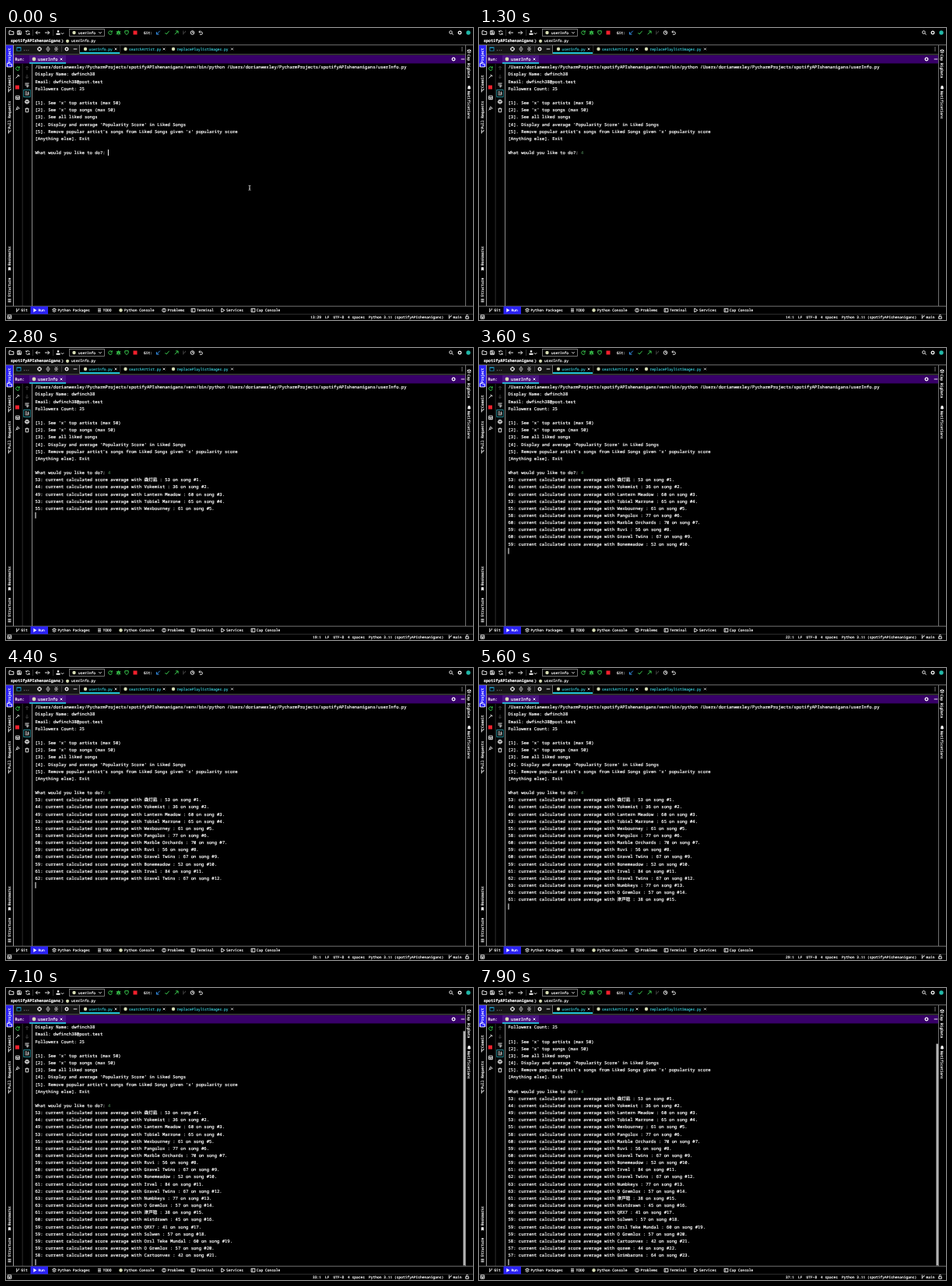
Animation of 600x375 px, one loop 8 s. Source, as an HTML page with a canvas:

```html
<!DOCTYPE html>
<html lang="en">
<head>
<meta charset="utf-8">
<title>Console run</title>
<style>
  html, body { margin: 0; width: 100%; height: 100%; overflow: hidden; background: #000; }
  canvas { display: block; width: 600px; height: 375px; }
</style>
</head>
<body>
<canvas id="stage" width="600" height="375"></canvas>
<script>
const ctx = document.getElementById('stage').getContext('2d');
ctx.textRendering = 'geometricPrecision';

const LOOP = 8000;
const MONO = '"Noto Sans Mono", "DejaVu Sans Mono", "Noto Sans CJK JP", "Noto Sans CJK", monospace';
const WHITE = '#fff', GREY = '#8c8c8c', DIM = '#4a4a4a', GREEN = '#3fdc55', RED = '#f2202c',
      BLUE = '#3aa0ff', CYAN = '#22d3e6', PURPLE = '#380069', SELECT = '#2b22f5', PY = '#d6dcb4';

const UI = 4.58;
const CODE = 5.56, CELL = CODE * 0.6, ROW = 9.15, LEFT = 37.5, TOP = 52.3;
const VISIBLE_ROWS = 34, PROMPT_ROW = 12;
const TYPED_AT = 100, ENTER_AT = 300, STATUS_LAG = 200, BLINK = 530;

const project = '/Users/dorianwexley/PycharmProjects/spotifyAPIshenanigans';
const intro = [
  `${project}/venv/bin/python ${project}/userInfo.py`,
  'Display Name: dwfinch38',
  'Email: dwfinch38@post.test',
  'Followers Count: 25',
  '',
  "[1]. See 'x' top artists (max 50)",
  "[2]. See 'x' top songs (max 50)",
  '[3]. See all liked songs',
  "[4]. Display and average 'Popularity Score' in Liked Songs",
  "[5]. Remove popular artist's songs from Liked Songs given 'x' popularity score",
  '[Anything else]. Exit',
  '',
  'What would you like to do?: '
];

// time, running average, artist, score
const songs = [
  [1500, 53, '森灯凪', 53],
  [1900, 44, 'Vokemist', 36],
  [2000, 49, 'Lantern Meadow', 60],
  [2400, 53, 'Tobiel Marrone', 65],
  [2600, 55, 'Wexbourney', 61],
  [2900, 58, 'Pangolox', 77],
  [3000, 60, 'Marble Orchards', 70],
  [3200, 59, 'Ruvi', 56],
  [3600, 60, 'Gravel Twins', 67],
  [3600, 59, 'Bonemeadow', 52],
  [4000, 61, 'Irvel', 84],
  [4400, 62, 'Gravel Twins', 67],
  [4700, 63, 'Numbkeys', 77],
  [5000, 63, 'O Gremlox', 57],
  [5200, 61, '津戸稔', 38],
  [5700, 60, 'mistdrawn', 45],
  [6000, 59, 'QRX7', 41],
  [6300, 59, 'Solwen', 57],
  [6600, 59, 'Orıl Teke Mundal', 60],
  [7000, 59, 'O Gremlox', 57],
  [7100, 58, 'Cartoonvex', 42],
  [7600, 57, 'qozem', 44],
  [7700, 57, 'Grimbarons', 64]
].map(([at, avg, artist, score], i) => ({
  at,
  text: `${avg}: current calculated score average with ${artist} : ${score} on song #${i + 1}.`
}));

const songCount = t => songs.filter(s => s.at <= t).length;

function rect(x, y, w, h, color) {
  ctx.fillStyle = color;
  ctx.fillRect(x, y, w, h);
}

function frameRect(x, y, w, h, color) {
  ctx.strokeStyle = color;
  ctx.lineWidth = 0.8;
  ctx.strokeRect(x, y, w, h);
}

function dot(x, y, r, color) {
  ctx.fillStyle = color;
  ctx.beginPath();
  ctx.arc(x, y, r, 0, 7);
  ctx.fill();
}

// Laid out at ten times the size so small glyph advances stay exact;
// a hairline outline keeps the thin stems bright.
function text(str, x, y, { size = UI, color = WHITE, weight = 500, align = 'left', turn = 0 } = {}) {
  ctx.save();
  ctx.translate(x, y);
  ctx.rotate(turn * Math.PI / 2);
  ctx.scale(0.1, 0.1);
  ctx.font = `${weight} ${size * 10}px ${MONO}`;
  ctx.textAlign = align;
  ctx.lineWidth = 2;
  ctx.lineJoin = 'round';
  ctx.fillStyle = ctx.strokeStyle = color;
  ctx.strokeText(str, 0, 0);
  ctx.fillText(str, 0, 0);
  ctx.restore();
}

const CIRCLE = 'M2.3 0A2.3 2.3 0 1 1 -2.3 0A2.3 2.3 0 1 1 2.3 0';
const SHAPES = {
  folder: 'M-3 2.3V-2.3H-.6L.2 -1.4H2.8V2.3Z',
  save: 'M-2.3 -2.3H1.6L2.4 -1.5V2.3H-2.3ZM-1 2.3V.5H1V2.3M-1 -2V-1H1',
  loop: 'M2.3 -.8A2.4 2.4 0 0 0 -2 -1.2M-2.2 -2.6V-1H-.7M-2.3 .8A2.4 2.4 0 0 0 2 1.2M2.2 2.6V1H.7',
  left: 'M3 0H-2.7M-.4 -2.3L-2.7 0L-.4 2.3',
  right: 'M-3 0H2.7M.4 -2.3L2.7 0L.4 2.3',
  up: 'M0 2.5V-2.2M-1.8 -.5L0 -2.3L1.8 -.5',
  down: 'M0 -2.5V2.2M-1.8 .5L0 2.3L1.8 .5',
  downLeft: 'M2.3 -2.3L-2 2M-2.1 -1V2.1H1',
  upRight: 'M-2.3 2.3L2 -2M2.1 1V-2.1H-1',
  check: 'M-2.6 .1L-.8 2L2.6 -2.2',
  chevron: 'M-1.7 -.8L0 .9L1.7 -.8',
  crumb: 'M-.7 -2.2L.7 0L-.7 2.2',
  cross: 'M-1.3 -1.3L1.3 1.3M1.3 -1.3L-1.3 1.3',
  minus: 'M-2.3 0H2.3',
  user: 'M-1.2 -2.8H1.2V-.4H-1.2ZM-2.5 2.7V.8H2.5V2.7Z',
  rerun: 'M1.9 -1.3A2.3 2.3 0 1 0 2.3 .5M2.3 -2.7V-.8H.4',
  bug: 'M-1.5 -1.3H1.5V1.5L0 2.6L-1.5 1.5ZM-2.8 -1.5L2.8 2M2.8 -1.5L-2.8 2M0 -2.7V-1',
  shield: 'M-2.2 -2.3H2.2V.5L0 2.6L-2.2 .5Z',
  branch: 'M-1.2 -2.5V2.5M1.5 -2.2V-.8L-1.2 .9',
  clock: CIRCLE + 'M0 -1.4V0H1.3',
  undo: 'M-2 -1H.8A1.6 1.6 0 0 1 .8 2.3H-1M-.7 -2.6L-2.2 -1L-.7 .5',
  search: 'M1.2 -.5A1.8 1.8 0 1 1 -2.4 -.5A1.8 1.8 0 1 1 1.2 -.5M.7 .8L2.6 2.7',
  gear: 'M1.6 0A1.6 1.6 0 1 1 -1.6 0A1.6 1.6 0 1 1 1.6 0M0 -2.8V-1.5M0 2.8V1.5M-2.8 0H-1.5M2.8 0H1.5M-2 -2L-1 -1M2 2L1 1M-2 2L-1 1M2 -2L1 -1',
  target: CIRCLE + 'M0 -3V-1M0 3V1M-3 0H-1M3 0H1',
  expand: 'M-2.5 0H2.5M-1.5 -1.5L0 -2.8L1.5 -1.5M-1.5 1.5L0 2.8L1.5 1.5',
  collapse: 'M-2.5 0H2.5M-1.5 -2.8L0 -1.3L1.5 -2.8M-1.5 2.8L0 1.3L1.5 2.8',
  wrench: 'M-2.4 2.4L.7 -.7M.4 -2.4V-.4H2.5',
  panel: 'M-2.3 -2.2H2.3V2.2H-2.3ZM-2.3 0H2.3M0 0V2.2',
  pin: 'M-.6 -2.4L2.4 .6M.3 -1.4L-1.7 0L0 1.7L1.4 -.3M-.9 .9L-2.5 2.5',
  wrap: 'M-2.6 -2H2.6M-2.6 0H1.5A1.1 1.1 0 0 1 1.5 2H-.3M.7 1L-.4 2L.7 3',
  end: 'M-2.5 -2H0M-2.5 0H0M-2.5 2H2.5M1.6 -2.4V.8M.6 -.2L1.6 .8L2.6 -.2',
  print: 'M-1.4 -1V-2.3H1.4V-1M-2.5 -.8H2.5V1H-2.5ZM-1.3 1V2.3H1.3V1',
  trash: 'M-2.4 -1.8H2.4M-1.7 -1.5V2.4H1.7V-1.5M-.7 -2.6H.7',
  play: 'M-1.7 -2.4L2.4 0L-1.7 2.4Z',
  stack: 'M-2.4 -1L0 -2.3L2.4 -1L0 .3ZM-2.4 .8L0 2.2L2.4 .8',
  list: 'M-2 -1.7H2M-2 0H2M-2 1.7H2',
  alert: CIRCLE + 'M0 -1.4V.3M0 .8V1.5',
  prompt: 'M-2.4 -2.2H2.4V2.2H-2.4ZM-1.5 -1L-.4 0L-1.5 1',
  bell: 'M-2.4 1.4L-1.6 .4V-1A1.6 1.6 0 0 1 1.6 -1V.4L2.4 1.4ZM-.7 1.8H.7V2.6H-.7Z',
  lock: 'M-1.8 -.3H1.8V2.3H-1.8ZM-1.1 -.3V-1.5A1.1 1.1 0 0 1 1.1 -1.5',
  mark: 'M-1.5 -2.3H1.5V2.3L0 1L-1.5 2.3Z',
  beam: 'M-1.4 -3L0 -2.4L1.4 -3M0 -2.4V2.4M-1.4 3L0 2.4L1.4 3M-.8 .6H.8'
};

function draw(name, x, y, color = WHITE, filled = false) {
  ctx.save();
  ctx.translate(x, y);
  ctx.lineWidth = 0.9;
  ctx.fillStyle = ctx.strokeStyle = color;
  const path = new Path2D(SHAPES[name]);
  filled ? ctx.fill(path) : ctx.stroke(path);
  ctx.restore();
}

function drawToolbar() {
  draw('folder', 7, 6);
  draw('save', 17, 6);
  draw('loop', 28, 6);
  draw('left', 41, 6);
  draw('right', 53, 6);
  rect(34, 2, 0.7, 8, DIM);
  rect(60, 2, 0.7, 8, DIM);
  draw('user', 67, 6, WHITE, true);
  draw('chevron', 72.5, 7);
  frameRect(81.5, 1.5, 45, 9, GREY);
  dot(87.5, 6, 2.2, PY);
  text('userInfo', 93, 7.6);
  draw('chevron', 121, 6);
  draw('rerun', 134, 6, GREEN);
  draw('bug', 144.5, 6, GREEN);
  draw('shield', 155, 6, GREEN);
  rect(163.5, 3.5, 5, 5, RED);
  text('Git:', 177, 7.6);
  draw('downLeft', 195.5, 6, BLUE);
  draw('check', 207, 6, GREEN);
  draw('upRight', 219, 6, GREEN);
  draw('branch', 229, 6, DIM);
  draw('clock', 239.5, 6);
  draw('undo', 250, 6);
  draw('search', 572, 6);
  draw('gear', 583, 6);
  dot(594, 6, 2.7, '#21b8a8');

  text('spotifyAPIshenanigans', 6, 18.4, { size: 5.08, weight: 700 });
  draw('crumb', 72.5, 16.8);
  dot(79, 16.8, 2.1, PY);
  text('userInfo.py', 84, 18.4, { size: 4.7 });
}

function drawTabs() {
  rect(10, 22, 84, 11.6, '#141414');
  rect(13.5, 24.5, 6, 5, '#1f93bd');
  rect(14.5, 26, 4, 2.8, '#000');
  text('...', 22, 28.6);
  draw('target', 43, 27);
  draw('expand', 54, 27);
  draw('collapse', 64.5, 27);
  draw('gear', 78, 27);
  draw('minus', 89, 27);
  rect(71, 23.5, 0.7, 7, DIM);
  rect(94, 22, 0.8, 11, GREY);
  rect(146.5, 22, 0.6, 11, DIM);
  const tabs = [['userInfo.py', 106.5, 141], ['searchArtist.py', 158, 203], ['replacePlaylistImages.py', 219.5, 290.5]];
  for (const [name, x, close] of tabs) {
    dot(x - 4.5, 27, 2.2, PY);
    text(name, x, 28.6, { color: '#35bcc8' });
    draw('cross', close, 27, '#d8d8d8');
  }
  rect(95, 31.2, 51, 1.8, CYAN);
  for (const y of [25, 27, 29]) dot(586, y, 0.6, WHITE);
}

function drawRunPanel() {
  rect(9, 35, 581, 10.5, PURPLE);
  rect(30, 35, 47, 10.5, '#4a1480');
  text('Run:', 11.5, 41.8, { size: 5.2 });
  dot(36, 40, 2.4, PY);
  text('userInfo', 41, 41.8, { size: 5.3 });
  draw('cross', 71, 40);
  rect(30, 44.2, 47, 1.6, CYAN);
  draw('gear', 575, 40);
  draw('minus', 587, 40);

  draw('rerun', 15, 52, GREEN);
  draw('wrench', 15, 62);
  rect(12, 73.6, 5, 5, RED);
  draw('panel', 15, 89.5);
  draw('pin', 15, 103);
  frameRect(22.8, 79.6, 8.4, 8.8, '#2fa9b5');
  ['up', 'down', 'wrap', 'end', 'print', 'trash'].forEach((name, i) =>
    draw(name, 27, 51.5 + i * 10.8, i < 2 ? DIM : WHITE));
}

function drawStripes() {
  rect(0, 22, 9, 28, SELECT);
  const side = (label, x, y, turn) => text(label, x, y, { turn });
  side('Project', 6.2, 45, -1);
  draw('folder', 4.5, 47.7);
  side('Commit', 6.2, 77, -1);
  draw('branch', 4.5, 80);
  side('Pull Requests', 6.2, 129.5, -1);
  draw('branch', 4.5, 133);
  side('Bookmarks', 6.2, 305, -1);
  draw('mark', 4.5, 309.5, WHITE, true);
  side('Structure', 6.2, 345.5, -1);
  draw('list', 4.5, 350);
  draw('stack', 595, 30);
  side('Cap BigData', 593.4, 34, 1);
  draw('bell', 595, 76.5, WHITE, true);
  side('Notifications', 593.4, 81, 1);

  rect(0, 21.4, 600, 0.8, GREY);
  rect(9, 33.6, 581, 0.7, GREY);
  rect(9, 22, 0.8, 335, '#c4c4c4');
  rect(20.8, 46, 0.6, 311, DIM);
  rect(33, 46, 0.8, 311, '#b0b0b0');
  rect(590, 22, 0.8, 335, GREY);
  rect(0, 356.8, 600, 0.8, GREY);
  rect(0, 367.4, 600, 0.6, DIM);
}

function drawBottomBar(t) {
  rect(31.5, 357.5, 22.5, 10, SELECT);
  const items = [
    ['branch', 'Git', 15], ['play', 'Run', 37], ['stack', 'Python Packages', 62],
    ['list', 'TODO', 120], [null, 'Python Console', 147.5], ['alert', 'Problems', 203],
    ['prompt', 'Terminal', 240.5], ['play', 'Services', 278.5], ['prompt', 'Cap Console', 317.5]
  ];
  for (const [name, label, x] of items) {
    if (name) draw(name, x, 362.5, WHITE, label === 'Run');
    else dot(x, 362.5, 2.2, PY);
    text(label, x + 4.5, 364.1);
  }

  const seen = songCount(t - STATUS_LAG);
  const position = t >= ENTER_AT ? `${14 + seen}:1` : t >= TYPED_AT ? '13:30' : '13:29';
  const y = 372.6;
  draw('panel', 4.5, 371);
  text(position, 405, y, { align: 'right' });
  text('LF', 410, y);
  text('UTF-8', 420.5, y);
  text('4 spaces', 439, y);
  text('Python 3.11 (spotifyAPIshenanigans)', 466, y);
  draw('branch', 570.5, 371);
  text('main', 574.5, y);
  draw('lock', 592.5, 371);
}

function drawConsole(t) {
  const count = songCount(t);
  const entered = t >= ENTER_AT;
  const caretRow = PROMPT_ROW + (entered ? 1 : 0) + count;
  const scroll = Math.max(0, caretRow + 1 - VISIBLE_ROWS);
  const rowY = row => TOP + (row - scroll) * ROW;

  ctx.save();
  ctx.beginPath();
  ctx.rect(34, 46, 557, 310.8);
  ctx.clip();
  const lines = [...intro, ...songs.slice(0, count).map(s => s.text)];
  lines.forEach((line, row) => text(line, LEFT, rowY(row), { size: CODE }));

  const promptEnd = LEFT + intro[PROMPT_ROW].length * CELL;
  if (t >= TYPED_AT) text('4', promptEnd, rowY(PROMPT_ROW), { size: CODE, color: '#3d6a45' });

  const moved = count ? songs[count - 1].at : entered ? ENTER_AT : t >= TYPED_AT ? TYPED_AT : 0;
  if ((t - moved) % (2 * BLINK) < BLINK) {
    const x = entered ? LEFT : promptEnd + (t >= TYPED_AT ? CELL : 0);
    rect(x, rowY(caretRow) - 6, 1, 7.8, WHITE);
  }
  if (scroll) {
    const height = 310 * VISIBLE_ROWS / (caretRow + 1);
    rect(587.4, 356.5 - height, 2.6, height, '#b4b4b4');
  }
  ctx.restore();

  if (t < TYPED_AT) draw('beam', 313, 205.3, '#d0d0d0');
}

function frame(now) {
  const t = now % LOOP;
  rect(0, 0, 600, 375, '#000');
  drawToolbar();
  drawTabs();
  drawRunPanel();
  drawStripes();
  drawBottomBar(t);
  drawConsole(t);
  requestAnimationFrame(frame);
}
requestAnimationFrame(frame);
</script>
</body>
</html>
```
